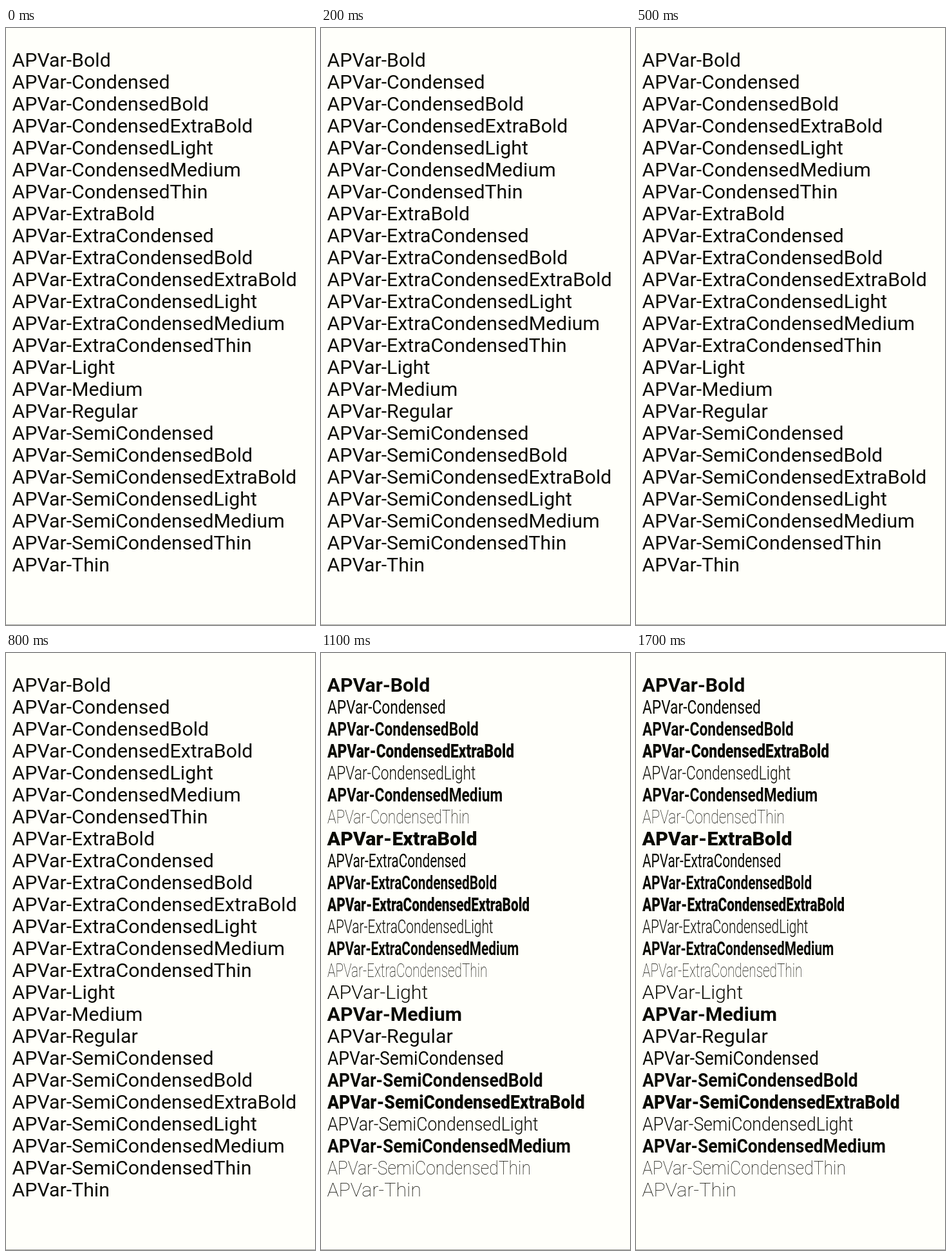
These frames come from a looping animation (480 px wide and 925 px high, 1.8 s). An HTML page:

```html
<!DOCTYPE html>
<html lang="en">
<head>
<meta charset="utf-8">
<title>Font styles</title>
<style>
  html, body { margin: 0; width: 100%; height: 100%; overflow: hidden; }
  body { background: #fffffa; border-bottom: 1px solid #a5a5a0; box-sizing: border-box; }
  #list {
    position: absolute; left: 9.5px; top: 33px;
    font: 30.3px/34px Roboto, sans-serif;
    color: #0b0b04; white-space: nowrap;
  }
  #list div { transform-origin: 0 0; }
</style>
</head>
<body>
<div id="list"></div>
<script>
const LOOP = 1800;
const WEIGHTS = { Thin: 100, Light: 300, Medium: 600, Bold: 700, ExtraBold: 900 };
// Width axis of the family, relative to the normal width
const WIDTHS = { SemiCondensed: 0.875, Condensed: 0.75, ExtraCondensed: 0.6875 };

const styles = ["", ...Object.keys(WIDTHS)]
  .flatMap(width => ["", ...Object.keys(WEIGHTS)].map(weight => ({
    name: width + weight || "Regular",
    weight: WEIGHTS[weight] || 400,
    width: WIDTHS[width] || 1,
  })))
  .sort((a, b) => a.name < b.name ? -1 : 1);

const list = document.getElementById("list");
const rows = styles.map(({ name }) => {
  const row = document.createElement("div");
  row.textContent = "APVar-" + name;
  list.append(row);
  return row;
});

function draw(now) {
  const styled = now % LOOP >= LOOP / 2;
  rows.forEach((row, i) => {
    const { weight, width } = styles[i];
    row.style.fontWeight = styled ? weight : 400;
    row.style.transform = styled ? `scaleX(${width})` : "none";
  });
  requestAnimationFrame(draw);
}
draw(performance.now());
</script>
</body>
</html>
```
